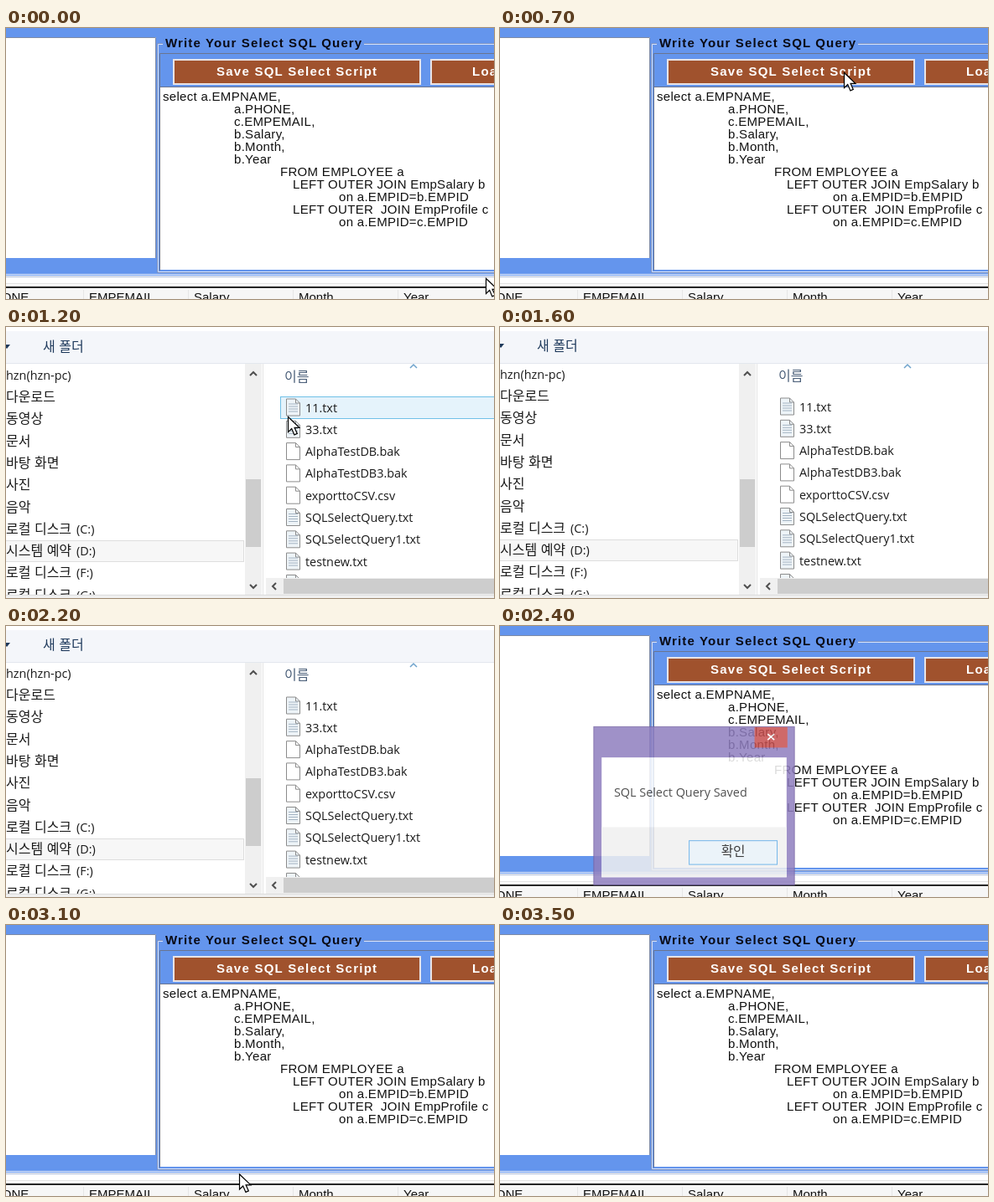
An HTML page for the animation above (3.6 s loop, 582 by 324 pixels).

```html
<!DOCTYPE html>
<html lang="ko">
<head>
<meta charset="utf-8">
<title>SQL query save</title>
<style>
  html, body { margin: 0; width: 100%; height: 100%; overflow: hidden; background: #fff; }
  svg { display: block; width: 100vw; height: 100vh; }
  text { white-space: pre; }
  .code { font: 15px "Liberation Sans", Arial, sans-serif; letter-spacing: .3px; fill: #111; }
  .column { letter-spacing: 0; }
  .bold { font: bold 15px "Liberation Sans", Arial, sans-serif; letter-spacing: 1.13px; fill: #0a0a14; }
  .onButton { letter-spacing: 1.25px; fill: #fff; }
  .ui { font: 14.4px "Open Sans", "Noto Sans", sans-serif; fill: #1a1a1a; }
  .ko { font: 16px "Noto Sans CJK KR", "Noto Sans CJK", sans-serif; fill: #1a1a1a; }
</style>
</head>
<body>
<svg id="stage" viewBox="0 0 582 324"></svg>
<script>
const rect = (x, y, w, h, fill, extra = '') =>
  `<rect x="${x}" y="${y}" width="${w}" height="${h}" fill="${fill}" ${extra}/>`;
const framed = (x, y, w, h, fill, stroke) =>
  rect(x + .5, y + .5, w - 1, h - 1, fill, `stroke="${stroke}"`);
const text = (x, y, cls, str, extra = '') =>
  `<text x="${x}" y="${y}" class="${cls}" ${extra}>${str}</text>`;
const line = (d, stroke, width = 1) =>
  `<path d="${d}" fill="none" stroke="${stroke}" stroke-width="${width}"/>`;

function brownButton(x, w) {
  return rect(x - 1, 37, w + 2, 31, '#e9e4e6') + rect(x + 1, 39, w - 2, 27, '#a0522d');
}

function queryForm() {
  const query = [
    [187, 'select a.EMPNAME,'], [272, 'a.PHONE,'], [272, 'c.EMPEMAIL,'],
    [272, 'b.Salary,'], [272, 'b.Month,'], [272, 'b.Year'],
    [327, 'FROM EMPLOYEE a'], [342, 'LEFT OUTER JOIN EmpSalary b'],
    [397, 'on a.EMPID=b.EMPID'], [342, 'LEFT OUTER  JOIN EmpProfile c'],
    [397, 'on a.EMPID=c.EMPID'],
  ];
  const columns = ['PHONE', 'EMPEMAIL', 'Salary', 'Month', 'Year'];
  return rect(0, 0, 582, 324, '#fff') + rect(0, 0, 582, 296, '#6495ed') +
    rect(-2, 11, 181, 264, '#fff') + line('M0 11.5H178.5V275', '#7f8ba5') +
    line('M187 18.5H180.5V292.5H582M427 18.5H582', '#7d93c4') +
    line('M187 19.5H181.5V291.5H582M427 19.5H582', '#d5e1fa') +
    line('M582 30.5H183.5V290', '#6a7590') +
    text(190, 23, 'bold', 'Write Your Select SQL Query') +
    brownButton(200, 294) + text(251, 57, 'bold onButton', 'Save SQL Select Script') +
    brownButton(507, 294) + text(556, 57, 'bold onButton', 'Load') +
    rect(184, 71, 398, 218, '#fff') + line('M184 70.5H582', '#6a7590') +
    query.map(([x, str], i) => text(x, 87 + 15 * i, 'code', str)).join('') +
    line('M0 294.5H582', '#dfe8fa') + line('M0 297.5H582', '#a9b7d6') +
    line('M0 305.5H582', '#e4e4e4') +
    rect(0, 311, 582, 13, '#f6f6f6') + line('M0 310H582', '#252525', 2) +
    columns.map((name, i) => text(125 * i - 26, 326.5, 'code column', name) +
      line(`M${92.5 + 125 * i} 313V324`, '#e6e6e6')).join('');
}

function fileIcon(y, lined) {
  const stripes = lined ? line(`M337 ${y + 6}h11m-11 3h11m-11 3h11m-11 3h11`, '#a3b3c2') : '';
  return `<path d="M334.5 ${y}h11l5 5v15h-16z" fill="${lined ? '#eef4f8' : '#fff'}" stroke="#8c8c8c"/>` +
    line(`M345.5 ${y}v5h5`, '#8c8c8c') + stripes;
}

function fileDialog() {
  const pitch = 26.3;
  const places = ['다운로드', '동영상', '문서', '바탕 화면', '사진', '음악',
    '로컬 디스크|C', '시스템 예약|D', '로컬 디스크|F', '로컬 디스크|G'];
  const files = ['11.txt', '33.txt', 'AlphaTestDB.bak', 'AlphaTestDB3.bak', 'exporttoCSV.csv',
    'SQLSelectQuery.txt', 'SQLSelectQuery1.txt', 'testnew.txt'];
  const placeRow = (item, i) => {
    const [name, drive] = item.split('|'), y = 88 + pitch * i;
    return text(0, y, 'ko', name) + (drive ? text(84, y, 'ui', `(${drive}:)`) : '');
  };
  const fileRow = (name, i) => fileIcon(85 + pitch * i, name.endsWith('txt')) +
    text(357, 100.5 + pitch * i, 'ui', name);
  return rect(0, 0, 582, 324, '#fff') + rect(0, 5, 582, 38, '#f4f6fa') +
    line('M0 43.5H582', '#e3e7ee') +
    `<g id="list"><path d="M-3 20H5L1 25z" fill="#1e395b"/>` +
    text(44, 28, 'ko', '새 폴더', 'style="fill:#1e395b"') +
    framed(-2, 254, 286, 26, '#f7f7f7', '#dedede') +
    text(0, 61.5, 'ui', 'hzn(hzn-pc)') + places.map(placeRow).join('') +
    text(332, 64, 'ko', '이름', 'style="fill:#4c607a"') +
    `<g id="hover">${framed(327, 82, 260, 27, '#e5f3fb', '#70c0e7')}</g>` +
    files.map(fileRow).join('') + fileIcon(295.5, true) + '</g>' +
    line('M482 49l4-4 4 4', '#6fa3cc', 1.5) +
    rect(285, 44, 20, 277, '#f0f0f0') + rect(286, 182, 18, 81, '#cdcdcd') +
    line('M291 58l4-4 4 4M291 308l4 4 4-4', '#505050', 2) +
    line('M306.5 44V321', '#e4e4e4') +
    rect(310, 300, 272, 20, '#f0f0f0') + rect(331, 301, 251, 18, '#cdcdcd') +
    line('M322 306l-4 4 4 4', '#505050', 2) +
    rect(0, 320, 582, 4, '#f0f0f0') + line('M0 320.5H582', '#dcdcdc');
}

function messageBox() {
  return framed(109, 118, 245, 194, '#8f7ebf', '#7463a3') +
    rect(119, 156, 225, 146, '#fff') + rect(119, 241, 225, 61, '#f0f0f0') +
    rect(305, 119, 40, 25, '#c75050') + line('M321 127.5l8 7m0-7l-8 7', '#fff', 1.8) +
    text(134, 204, 'ui', 'SQL Select Query Saved', 'style="font-size:14.7px;fill:#333"') +
    framed(225, 257, 108, 30, '#e8f1f9', '#5aa9e6') +
    text(279, 276, 'ko', '확인', 'text-anchor="middle"');
}

const arrow = '<path d="M.5 .5V18.5l4.2-3.9 3.2 7.3 3.4-1.5-3.2-7.1h5.8z" ' +
  'fill="#fff" stroke="#000" stroke-width="1.2"/>';

document.getElementById('stage').innerHTML = queryForm() +
  `<g id="files">${fileDialog()}</g><g id="message">${messageBox()}</g><g id="cursor">${arrow}</g>`;
const [files, list, hover, message, cursor] =
  ['files', 'list', 'hover', 'message', 'cursor'].map(id => document.getElementById(id));

// Cursor strokes: start, end, from, to
const strokes = [
  [0, 600, [572, 299], [410, 53]],
  [800, 1200, [410, 53], [336, 107]],
  [1200, 1600, [336, 107], [372, 326]],
  [2400, 2700, [300, 326], [274, 269]],
  [2900, 3300, [274, 269], [282, 326]],
];
const clamp = v => Math.min(1, Math.max(0, v));
const ramp = (t, a, b) => clamp((t - a) / (b - a));

function cursorAt(t) {
  const [a, b, from, to] = strokes.filter(s => s[0] <= t).pop();
  const p = ramp(t, a, b), eased = p * p * (3 - 2 * p);
  return from.map((v, i) => v + (to[i] - v) * eased);
}

function show(node, opacity) {
  node.style.display = opacity > 0 ? '' : 'none';
  node.setAttribute('opacity', opacity);
}

function render(t) {
  show(files, t < 2300 ? ramp(t, 800, 1000) : 0);
  list.setAttribute('transform', `translate(0 ${1 - ramp(t, 1200, 1600)})`);
  show(hover, t >= 1200 && t < 1300 ? 1 : 0);

  const opening = t < 2400 ? 0 : t < 2500 ? .85 : 1;
  const opacity = opening * (1 - ramp(t, 2800, 3000));
  const scale = .87 + .13 * opacity;
  show(message, opacity);
  message.setAttribute('transform',
    `translate(231.5 215) scale(${scale}) translate(-231.5 -215)`);

  const [x, y] = cursorAt(t);
  show(cursor, y < 324 ? 1 : 0);
  cursor.setAttribute('transform', `translate(${x} ${y})`);
}

function tick() {
  render(Math.floor(performance.now() % 3600 / 100) * 100);
  requestAnimationFrame(tick);
}
tick();
</script>
</body>
</html>
```
